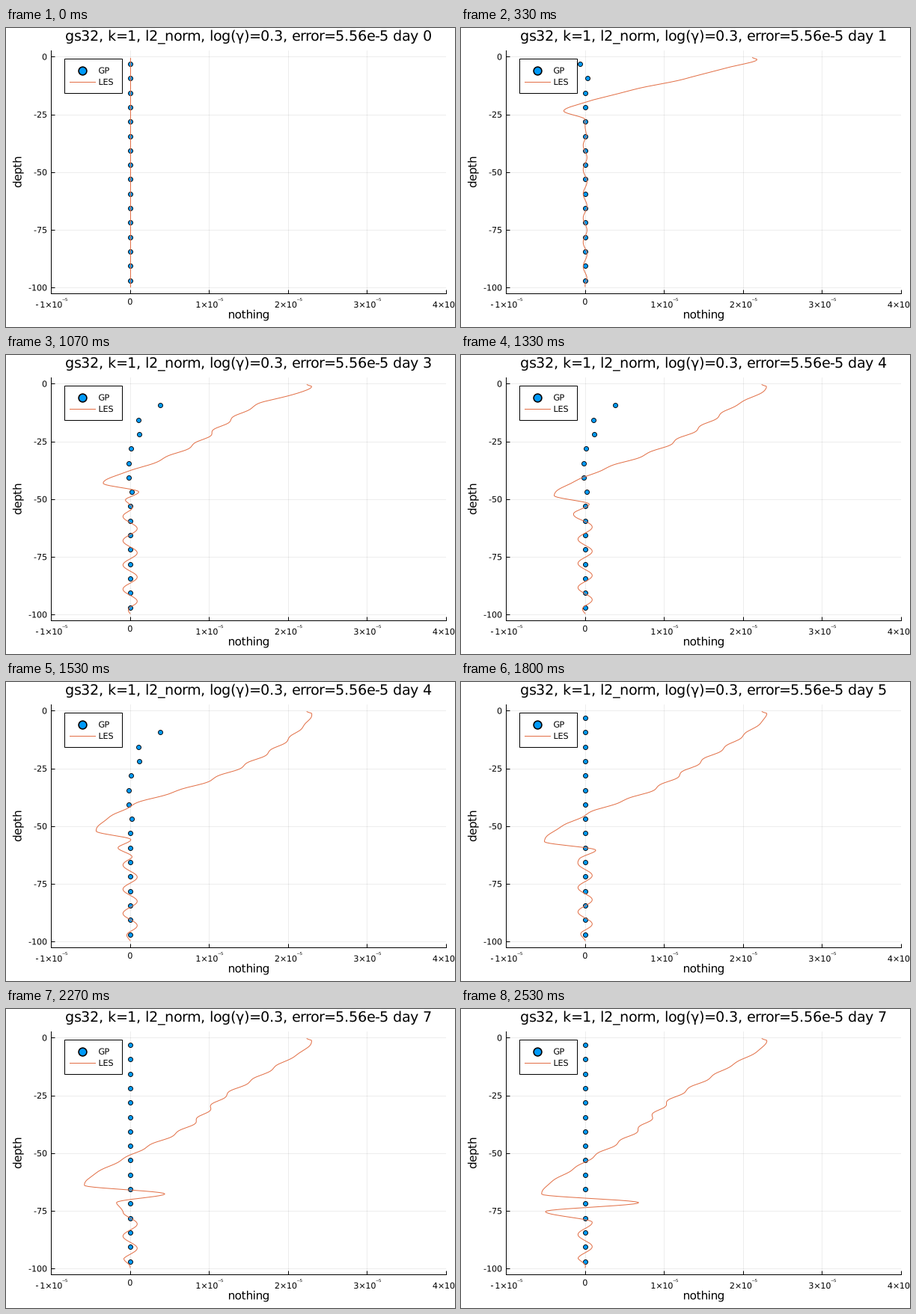
Animation of 600 by 400 pixels, one loop 2590 ms. Source, as a matplotlib script:

```python
import math

import numpy as np
import matplotlib.pyplot as plt
from matplotlib.animation import FuncAnimation
from matplotlib.patches import PathPatch, Rectangle
from matplotlib.path import Path
from matplotlib.textpath import TextPath
from matplotlib.transforms import Affine2D

plt.rcParams["font.family"] = "DejaVu Sans"

W, H, DPI = 600, 400, 100
LOOP, TICK, FPS = 2590, 10, 15
DAYS_PER_STEP = 5 / 24
LEFT, RIGHT, TOP, BOTTOM = 60.3, 587.9, 30.4, 355.2
CENTER = (LEFT + RIGHT) / 2
BLUE, ORANGE = "#009afa", "#e26f46"
PX = 72 / DPI  # points per pixel
TITLE_SIZE, LABEL_SIZE, TICK_SIZE, SUP_SIZE = 19, 15.3, 11.15, 9
TITLE = "gs32, k=1, l2_norm, log(γ)=0.3, error=5.56e-5 day {}"

DEPTH = np.linspace(0.4, 99.6, 300)
GP_DEPTH = 3.125 + 6.25 * np.arange(16)

# Flux (1e-5) by step: at 0.2, 0.4, 0.6, 0.8 and 1.0 of the mixed layer,
# then at the spike and the dip just below it.
KEYS = {
    5: (1.80, 1.28, 0.64, 0.10, -0.27, 0.00, 0.00),
    12: (1.88, 1.46, 1.23, 0.47, -0.28, -0.08, -0.10),
    16: (1.64, 1.20, 0.84, 0.28, -0.34, 0.11, -0.07),
    23: (2.07, 1.61, 0.92, -0.02, -0.43, 0.01, -0.16),
    31: (1.88, 1.26, 0.82, 0.00, -0.60, 0.26, 0.03),
    38: (1.77, 1.08, 0.64, -0.02, -0.55, 0.68, -0.48),
}

# First step of each GP state and its values from the top; the rest are zero.
GP_STATES = [
    (0, []),
    (1, [-0.065, 0.03]),
    (14, [-0.5, 0.38, 0.104, 0.118, 0.01, -0.02, -0.016, 0.02]),
    (27, []),
]


def smooth(q, z, v):
    """Monotone cubic interpolation of v(z) at q."""
    dz = np.diff(z)
    s = np.diff(v) / dz
    prod, total = s[:-1] * s[1:], s[:-1] + s[1:]
    m = np.zeros_like(v)
    m[1:-1] = np.where(prod > 0, 2 * prod / np.where(prod > 0, total, 1), 0)
    k = np.clip(np.searchsorted(z, q) - 1, 0, len(z) - 2)
    t = (q - z[k]) / dz[k]
    return ((1 + 2 * t) * (1 - t) ** 2 * v[k] + t ** 2 * (3 - 2 * t) * v[k + 1]
            + dz[k] * t * (1 - t) * ((1 - t) * m[k] - t * m[k + 1]))


def les(step):
    """Flux over DEPTH: a deepening mixed layer above faint internal waves."""
    if step == 0:
        return np.zeros_like(DEPTH)
    h = 10.15 * step ** 0.522
    top = min(2.3, 2.08 + 0.02 * step)
    row = [np.interp(step, list(KEYS), col) for col in zip(*KEYS.values())]
    z = np.array([0.4, 1.2, 0.2 * h, 0.4 * h, 0.6 * h, 0.8 * h, h,
                  h + 3.7, h + 7.5, h + 12, 100])
    v = np.array([top - 0.06, top, *row, 0, 0])

    inside = np.clip(DEPTH / h, 0, 1)
    ripple = 0.035 * np.sin(np.pi * inside) * np.sin(1.1 * DEPTH + 0.5 * step)
    fade = np.clip((DEPTH - h - 6) / 6, 0, 1) * np.clip((99.6 - DEPTH) / 4, 0, 1)
    size = 0.09 * min(1, step / 12) ** 1.5
    crest = 97 - 0.17 * step
    waves = size * fade * np.cos(2 * np.pi * (DEPTH - crest) / 10.5)
    return smooth(DEPTH, z, v) + ripple * min(1, step / 12) + waves


def gp(step):
    lead = [vals for start, vals in GP_STATES if start <= step][-1]
    return np.array(lead + [0] * (len(GP_DEPTH) - len(lead)))


def right_edge(s, size):
    return TextPath((0, 0), s, size=size).get_extents().x1


def typeset(s, size):
    """Glyph outlines set with whole-pixel advances, and the total width."""
    glyphs, x = [], 0
    for c in s:
        if c != " ":
            glyphs.append(TextPath((x, 0), c, size=size))
        x += math.floor(right_edge(c + "|", size) - right_edge("|", size) + 0.01)
    return Path.make_compound_path(*glyphs), x


def text_path(x, y, s, size=TICK_SIZE, align=0.0, angle=0):
    """Text with its baseline at pixel (x, y) from the top left."""
    path, width = typeset(s, size)
    move = Affine2D().translate(-align * width, 0).rotate_deg(angle).translate(x, H - y)
    return path.transformed(move)


fig = plt.figure(figsize=(W / DPI, H / DPI), dpi=DPI, facecolor="white")
ax = fig.add_axes([LEFT / W, 1 - BOTTOM / H, (RIGHT - LEFT) / W, (BOTTOM - TOP) / H])
ax.set_xlim(-1, 4)
ax.set_ylim(-102.6, 2.6)
ax.set_xticks(range(-1, 5))
ax.set_yticks(range(-100, 1, 25))
ax.tick_params(direction="in", length=5 * PX, width=PX, labelleft=False, labelbottom=False)
ax.grid(color="black", alpha=0.1, lw=0.7 * PX)
ax.set_axisbelow(True)
for side in ("top", "right"):
    ax.spines[side].set_visible(False)
for side in ("left", "bottom"):
    ax.spines[side].set_linewidth(PX)

dots, = ax.plot([], [], "o", ms=6 * PX, mfc=BLUE, mec="black", mew=0.9 * PX,
                zorder=3, snap=False)
curve, = ax.plot([], [], color=ORANGE, lw=PX, zorder=4)

# Pixel layer for the texts and the legend
page = fig.add_axes([0, 0, 1, 1])
page.set_xlim(0, W)
page.set_ylim(0, H)
page.axis("off")


def label(*args, **kw):
    return page.add_patch(PathPatch(text_path(*args, **kw), fc="black", lw=0, zorder=5))


for n in range(5):
    label(55, 38.6 + 77.2 * n + 4, str(-25 * n), align=1)
for n in range(-1, 5):
    x = LEFT + (n + 1) * (RIGHT - LEFT) / 5
    if n == 0:
        label(x, 370, "0", align=0.5)
        continue
    if n < 0:
        label(x - 21, 374, "-")
        x += 3
    label(x - 18, 374, f"{abs(n)}×10")
    label(x + 11.5, 368, "⁻⁵", size=SUP_SIZE)
label(CENTER, 388.5, "nothing", size=LABEL_SIZE, align=0.5)
label(20.5, 193, "depth", size=LABEL_SIZE, align=0.5, angle=90)

page.add_patch(Rectangle((77.5, H - 86.5), 77, 46, fc="white", ec="black", lw=PX))
page.plot(101.5, H - 57, "o", ms=10.8 * PX, mfc=BLUE, mec="black", mew=1.6 * PX)
page.plot([84.5, 119], [H - 72, H - 72], color=ORANGE, lw=PX)
label(123.5, 60.7, "GP")
label(123.5, 76, "LES")

titles = [text_path(CENTER, 17, TITLE.format(day), size=TITLE_SIZE, align=0.5)
          for day in range(8)]
title = page.add_patch(PathPatch(titles[0], fc="black", lw=0))


def draw(tick):
    step = int((tick + 0.5) * TICK * FPS / 1000)
    title.set_path(titles[int(step * DAYS_PER_STEP)])
    dots.set_data(gp(step), -GP_DEPTH)
    curve.set_data(les(step), -DEPTH)
    return title, dots, curve


anim = FuncAnimation(fig, draw, frames=LOOP // TICK, interval=TICK,
                     init_func=lambda: draw(0), repeat=True, repeat_delay=0, blit=False)
plt.show()
```
